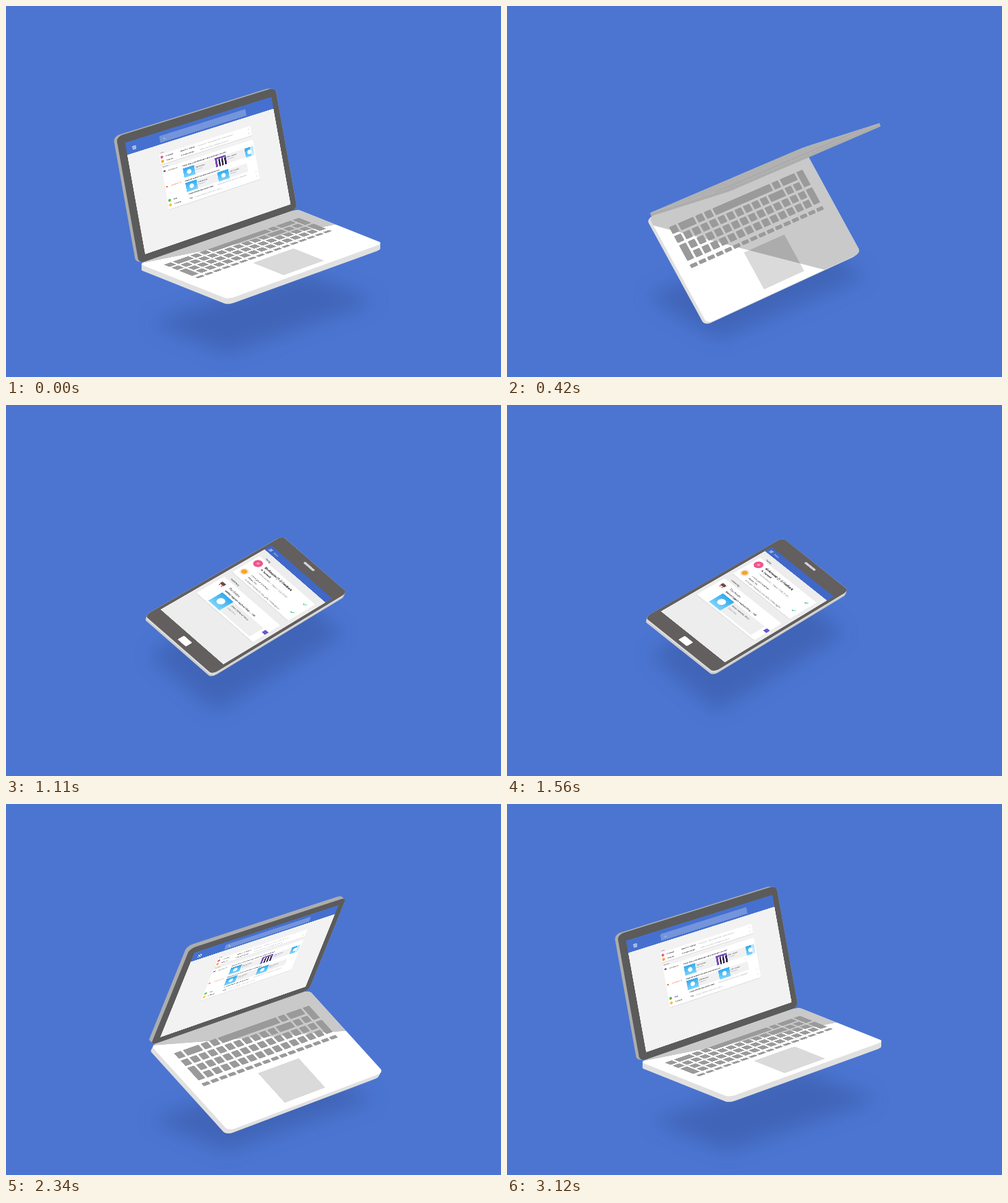
Recreate the animation shown at these times as an HTML page. Size 726 by 544 pixels, loop 3150 ms.

```html
<!DOCTYPE html>
<html lang="en">
<head>
<meta charset="utf-8">
<title>Folding laptop</title>
<style>
  html, body { margin: 0; width: 100%; height: 100%; overflow: hidden; background: #4b75d1; }
  #stage { position: relative; width: 726px; height: 544px; overflow: hidden; }
  #stage svg, .panel { position: absolute; left: 0; top: 0; }
  .face { transform-origin: 0 0; overflow: hidden; }
  text { font-family: Roboto, Arial, sans-serif; }
</style>
</head>
<body>
<div id="stage"></div>
<script>
const LOOP = 3150, STEP = 30, RAD = Math.PI / 180, ROUND = .04;
const stage = document.getElementById('stage');

// ---- drawing helpers ----
const rect = (x, y, w, h, fill, r = 0) =>
  `<rect x="${x}" y="${y}" width="${w}" height="${h}" rx="${r}" fill="${fill}"/>`;
const dot = (x, y, r, fill) => `<circle cx="${x}" cy="${y}" r="${r}" fill="${fill}"/>`;
const label = (x, y, size, str, bold, fill = '#444') =>
  `<text x="${x}" y="${y}" font-size="${size}" font-weight="${bold ? 700 : 400}" fill="${fill}">${str}</text>`;
const line = (d, color, w) => `<path d="${d}" fill="none" stroke="${color}" stroke-width="${w}"/>`;
const check = (x, y, s) => line(`M${x} ${y}l${s} ${s}l${s * 2} ${-s * 2}`, '#35c08a', s * .7);
const menu = (x, y, w, gap) => [0, 1, 2].map(i => rect(x, y + i * gap, w, gap / 2, '#fff')).join('');
const card = (x, y, w, h) => rect(x, y + 1.5, w, h, '#d6d6d6', 2) + rect(x, y, w, h, '#fff', 2);
const photo = (x, y, w, h) => rect(x, y, w, h, 'url(#sky)') + dot(x + w / 2, y + h / 2, h * .24, '#fff');

function mailRow(y, color, who, what, more) {
  return dot(119, y, 4.2, color) + label(131, y + 2, 4.5, who, 1) + label(176, y + 2, 4.5, what, 1) +
    label(182 + what.length * 2.35, y + 2, 4.2, more, 0, '#888') + check(384, y - 1, 1.2);
}

function parcel(x, y, art) {
  return art + label(x + 37, y + 10, 4.5, 'Order received') + label(x + 37, y + 16, 4, 'View parcel', 0, '#5c7fc8');
}

function laptopScreen() {
  let s = rect(0, 0, 490, 384, '#5b5b5b') + rect(22, 25, 451, 338, '#f2f2f2') +
    rect(22, 25, 451, 37, '#4570cf') + rect(122, 37, 266, 20, 'rgba(255,255,255,.25)') + menu(40, 42, 11, 4) +
    line('M137 49l3 3M137 46a2.3 2.3 0 1 1 -.1 -.1', '#dde6fa', 1);
  s += label(116, 88, 4, 'Today') + card(113, 91, 281, 30) + label(116, 131, 4, 'Yesterday') + card(113, 134, 281, 124);
  s += mailRow(100, '#f0568e', 'R. Tamwell', 'Notes (1-3) Feedback', 'Homeowners — Today, long list of the remarks and answers') +
    mailRow(113, '#f6a430', 'Rolan, me', 'I love your tutorials', 'Thanks for your gifts, I really appreciate them all') +
    mailRow(232, '#66bb5a', 'Trips', 'A weekend by the lake and more ideas', 'Here is the plan for the trip we were talking about') +
    mailRow(246, '#f8c332', 'S. Marlow', 'Hello', 'See you on Monday, we have lots to catch up');
  s += rect(116, 141, 6, 4, '#6b4a45') + label(131, 146, 4.5, 'Purchases (4)');
  s += rect(116, 188, 5, 4, '#ef6a3a') + label(131, 192, 4.5, 'Promotions (3)', 0, '#ef6a3a');
  s += label(173, 147, 4.5, 'Harbour Shop, Lumen Market: your orders and receipts of the week', 1);
  s += label(173, 193, 4.5, 'Orders and parcels of the month: where are they now', 1);
  s += rect(173, 153, 217, 27, '#f1f1f1') + rect(173, 198, 190, 26, '#f1f1f1');
  let poster = rect(271, 153, 34, 28, '#7347b5');
  for (let x = 277; x < 300; x += 9) poster += rect(x, 158, 6, 23, '#fff') + rect(x + 4, 160, 4, 21, '#26232e');
  s += parcel(173, 153, photo(173, 153, 34, 28)) + parcel(271, 153, poster) +
    parcel(173, 198, photo(173, 197, 34, 28)) + parcel(271, 198, photo(271, 197, 34, 28));
  return s + photo(364, 153, 27, 28) + rect(381, 153, 13, 28, 'rgba(255,255,255,.65)');
}

function lidBack() {
  return rect(0, 0, 490, 384, '#cacaca') + rect(5, 5, 480, 374, '#b1b1b1', 15) + rect(5, 5, 480, 92, 'url(#fold)', 15);
}

// each digit is a key's width, a point is a gap
function keyboard() {
  let s = rect(0, 0, 490, 340, '#fff') + rect(188, 200, 128, 119, '#dadada') +
    '<polygon id="shade" fill="rgba(0,0,0,.21)"/>';
  const full = '1'.repeat(16), unit = 26.6;
  ['12117121', '11111111111211.', full, `.${full.slice(2)}.`, full].forEach((row, i) => {
    let x = 36;
    [...row].forEach((key, j) => {
      const w = +key || 1, end = j === row.length - 1;
      const tall = (i === 0 && end) || (i === 2 && (end || j === 0));
      const y = 49 + i * 29 + (i === 4 ? 4 : 0), h = i === 4 ? 11 : tall ? 50 : 22;
      if (key !== '.') s += rect(x, y, w * unit - 6, h, '#9a9a9a', 2);
      x += w * unit;
    });
  });
  return s;
}

function tablet() {
  let s = rect(0, 0, 264, 440, '#635f5f') + rect(9, 44, 246, 354, '#ededed') + rect(9, 44, 246, 22, '#3f68c9') +
    rect(109, 13, 40, 7, '#d2d2d2', 3) + rect(116, 410, 32, 20, '#fff', 3) + menu(17, 52, 9, 3);
  s += label(34, 58, 7, 'Inbox', 0, '#dbe5fb') + label(36, 87, 7.5, 'Today');
  s += card(20, 91, 223, 89) + dot(38, 111, 12.5, '#f0568e') + dot(38, 111, 4, '#f79abb');
  s += label(60, 109, 8.5, 'Workmaster (1-3) Feedback', 1, '#222') + label(60, 121, 7.5, 'R. Tamwell', 1, '#222');
  s += label(60, 133, 7, '— Homeowners — Today 1 2:03, 00:20...', 0, '#888');
  s += check(222, 111, 3) + dot(38, 156, 12, '#f5e9dd') + dot(38, 156, 8, '#f6a430');
  s += label(60, 152, 8, 'I love your tutorials') + label(60, 163, 7.5, 'Rolan, me');
  s += label(60, 174, 7, 'Hi Rolan! Thanks for your gifts, I really appre...', 0, '#777') + check(222, 153, 3);
  s += label(36, 200, 7.5, 'Yesterday') + card(20, 206, 223, 89);
  s += rect(31, 220, 14, 9, '#6b4a45', 1) + dot(34, 232, 2, '#d9483b') + dot(42, 232, 2, '#d9483b');
  s += label(60, 224, 8.5, 'Purchases') + label(60, 237, 7, 'Market Support, Harbour Shop ... +99', 1);
  s += rect(60, 244, 176, 45, '#efefef') + photo(60, 244, 44, 45);
  s += label(110, 258, 7.5, 'Order Harbour Shop') + label(110, 270, 7, 'Cloud box', 0, '#999');
  return s + rect(223, 244, 20, 45, '#fff') + rect(231, 244, 12, 12, '#6a55cf');
}

stage.innerHTML = `<svg width="726" height="544"><defs>
  <linearGradient id="sky" x2="0" y2="1"><stop stop-color="#32a9ee"/><stop offset="1" stop-color="#7dd3fb"/></linearGradient>
  <linearGradient id="fold" x2="0" y2="1"><stop stop-color="#b1b1b1"/><stop offset="1" stop-color="#a6a7aa"/></linearGradient>
  <filter id="soft" x="-30%" y="-40%" width="160%" height="180%"><feGaussianBlur stdDeviation="14"/></filter></defs>
  <polygon id="shadow" fill="#3d61b0" opacity=".78" filter="url(#soft)"/></svg>`;

function makeFace(parent, w, h, art) {
  parent.insertAdjacentHTML('beforeend', `<svg class="face" width="${w}" height="${h}"
    style="border-radius:${ROUND * 100}%">${art}</svg>`);
  return { el: parent.lastElementChild, w, h };
}
function makePanel() {
  const el = document.createElement('div');
  el.className = 'panel';
  el.innerHTML = '<svg width="726" height="544"><polygon/></svg>';
  stage.append(el);
  return { el, body: el.querySelector('polygon') };
}
const lid = makePanel(), base = makePanel();
lid.inner = makeFace(lid.el, 490, 384, laptopScreen());
lid.outer = makeFace(lid.el, 490, 384, lidBack());
base.inner = makeFace(base.el, 490, 340, keyboard());
base.outer = makeFace(base.el, 264, 440, tablet());
const shade = document.getElementById('shade'), shadow = document.getElementById('shadow');

// ---- motion ----
const sine = x => .5 - .5 * Math.cos(Math.PI * x);
const inOut = x => x < .5 ? 4 * x ** 3 : 1 - 4 * (1 - x) ** 3;
const easeIn = x => x ** 3;
const easeOut = x => 1 - (1 - x) ** 2;
const phase = (t, from, to) => Math.min(1, Math.max(0, (t - from) / (to - from)));

function poseAt(t) {
  // 0 is the laptop, 1 the tablet
  const fold = sine(phase(t, 90, 800)) - sine(phase(t, 1800, 2400));
  const lift = fold ** 1.25;
  // half a turn over, a slight rock, then back and settle
  const spin = -1 - 200 * sine(phase(t, 90, 1110)) + 3 * sine(phase(t, 1110, 1560)) +
    195.5 * inOut(phase(t, 1800, 2600)) + 1.5 * sine(phase(t, 2600, 3120));
  const gap = 105 * (1 - easeIn(phase(t, 90, 600)) + easeOut(phase(t, 1760, 2600)));
  const sway = Math.sin(Math.PI * phase(t, 1800, 2600));
  return {
    fold, sway, baseAngle: spin * RAD, lidAngle: (spin + gap) * RAD,
    hinge: [232 - 34 * fold ** 3, -80 - 40 * fold],
    center: [376.5 - 25.5 * fold, 364 - 69.5 * lift],
    baseSize: .985 - .185 * fold ** 3, lidSize: 1.04 - .24 * fold ** 3
  };
}

// ---- geometry ----
// Panels swing around the hinge on an ellipse spanned by U and V; EDGE is the angle seen edge-on.
const U = [133, 50], V = [0, -172], EDGE = 35 * RAD;
const at = (r, a) => [0, 1].map(i => r * (Math.cos(a) * U[i] + Math.sin(a) * V[i]));
const add = (p, q, s = 1) => [p[0] + q[0] * s, p[1] + q[1] * s];
const cross = (o, p, q) => (p[0] - o[0]) * (q[1] - o[1]) - (p[1] - o[1]) * (q[0] - o[0]);
const setPoints = (el, pts) => el.setAttribute('points', pts.map(p => p.map(v => v.toFixed(2))).join(' '));

// maps a face onto four corners in perspective, hidden when turned away
function place(face, [p0, p1, p2, p3]) {
  const visible = cross(p0, p1, p3) > 60;
  face.el.style.display = visible ? '' : 'none';
  if (!visible) return;
  const d1 = add(p1, p2, -1), d2 = add(p3, p2, -1);
  const s = [0, 1].map(i => p0[i] - p1[i] + p2[i] - p3[i]);
  const den = d1[0] * d2[1] - d2[0] * d1[1];
  const g = (s[0] * d2[1] - d2[0] * s[1]) / den, h = (d1[0] * s[1] - s[0] * d1[1]) / den;
  const a = [0, 1].map(i => (p1[i] - p0[i] + g * p1[i]) / face.w);
  const b = [0, 1].map(i => (p3[i] - p0[i] + h * p3[i]) / face.h);
  const m = [...a, 0, g / face.w, ...b, 0, h / face.h, 0, 0, 1, 0, ...p0, 0, 1];
  face.el.style.transform = `matrix3d(${m.map(v => v.toFixed(9)).join()})`;
}

function hull(points) {
  const half = list => list.reduce((out, p) => {
    while (out.length > 1 && cross(out[out.length - 2], out[out.length - 1], p) <= 0) out.pop();
    out.push(p);
    return out;
  }, []).slice(0, -1);
  const sorted = points.sort((p, q) => p[0] - q[0] || p[1] - q[1]);
  const low = half(sorted);
  return [...low, ...half(sorted.reverse())];
}

// outline of a plate with rounded corners
function outline([a, b, c, d]) {
  return Array.from({ length: 28 }, (_, k) => {
    const corner = Math.floor(k / 7), ang = (corner + (k % 7) / 6) * Math.PI / 2;
    const u = (corner % 3 ? ROUND : 1 - ROUND) + ROUND * Math.cos(ang);
    const v = (corner < 2 ? 1 - ROUND : ROUND) + ROUND * Math.sin(ang);
    return [0, 1].map(i => (1 - v) * (a[i] + u * (b[i] - a[i])) + v * (d[i] + u * (c[i] - d[i])));
  });
}

function drawPanel(panel, origin, hinge, size, ang, side, thick, color) {
  const out = ang + side * Math.PI / 2, arm = at(size, ang), end = add(origin, hinge);
  const quad = [origin, end, add(end, arm, .96), add(origin, arm)];
  const back = quad.map(p => add(p, at(thick, out)));
  setPoints(panel.body, hull([...outline(quad), ...outline(back)]));
  panel.body.setAttribute('fill', color);
  return { quad, back, depth: Math.cos(ang - EDGE) + .05 * Math.cos(out - EDGE) };
}

function render(t) {
  const { fold, sway, baseAngle, lidAngle, hinge, center, baseSize, lidSize } = poseAt(t);
  const middle = add(center, [11, 15], sway);
  const origin = add(add(middle, hinge, -.5), at(baseSize, baseAngle), -.5);
  const thin = 1 - .6 * fold, turned = baseAngle < -90 * RAD;

  const b = drawPanel(base, origin, hinge, baseSize, baseAngle, -1, .048 * thin, '#e0e0e0');
  const d = drawPanel(lid, origin, hinge, lidSize, lidAngle, 1, .034 * thin, turned ? '#d4d4d4' : '#adadad');
  const [b0, b1, b2, b3] = b.back, [q0, q1, q2, q3] = d.quad, [k0, k1, k2, k3] = d.back;
  place(base.inner, b.quad);
  place(base.outer, [b2, b1, b0, b3]);
  place(lid.inner, [q3, q2, q1, q0]);
  place(lid.outer, [k2, k3, k0, k1]);
  lid.el.style.zIndex = d.depth > b.depth ? 2 : 1;
  base.el.style.zIndex = d.depth > b.depth ? 1 : 2;

  const floor = add(center, [1, 85 - 28 * fold]), deep = [110 - 13 * fold, 44 + 38 * fold];
  setPoints(shadow, [[-1, -1], [-1, 1], [1, 1], [1, -1]]
    .map(([i, j]) => add(add(floor, hinge, .47 * i), deep, .5 * j)));
  // the lid shades the keyboard above a slanted line
  const low = .18 * fold, slant = .45 + 1.73 * fold;
  setPoints(shade, [[0, 0], [490, 0], [490, 340 * (low + slant)], [0, 340 * low]]);
}

const start = performance.now();
function frame() {
  const t = (performance.now() - start) % LOOP;
  render(Math.floor(t / STEP) * STEP);
  requestAnimationFrame(frame);
}
frame();
</script>
</body>
</html>
```
